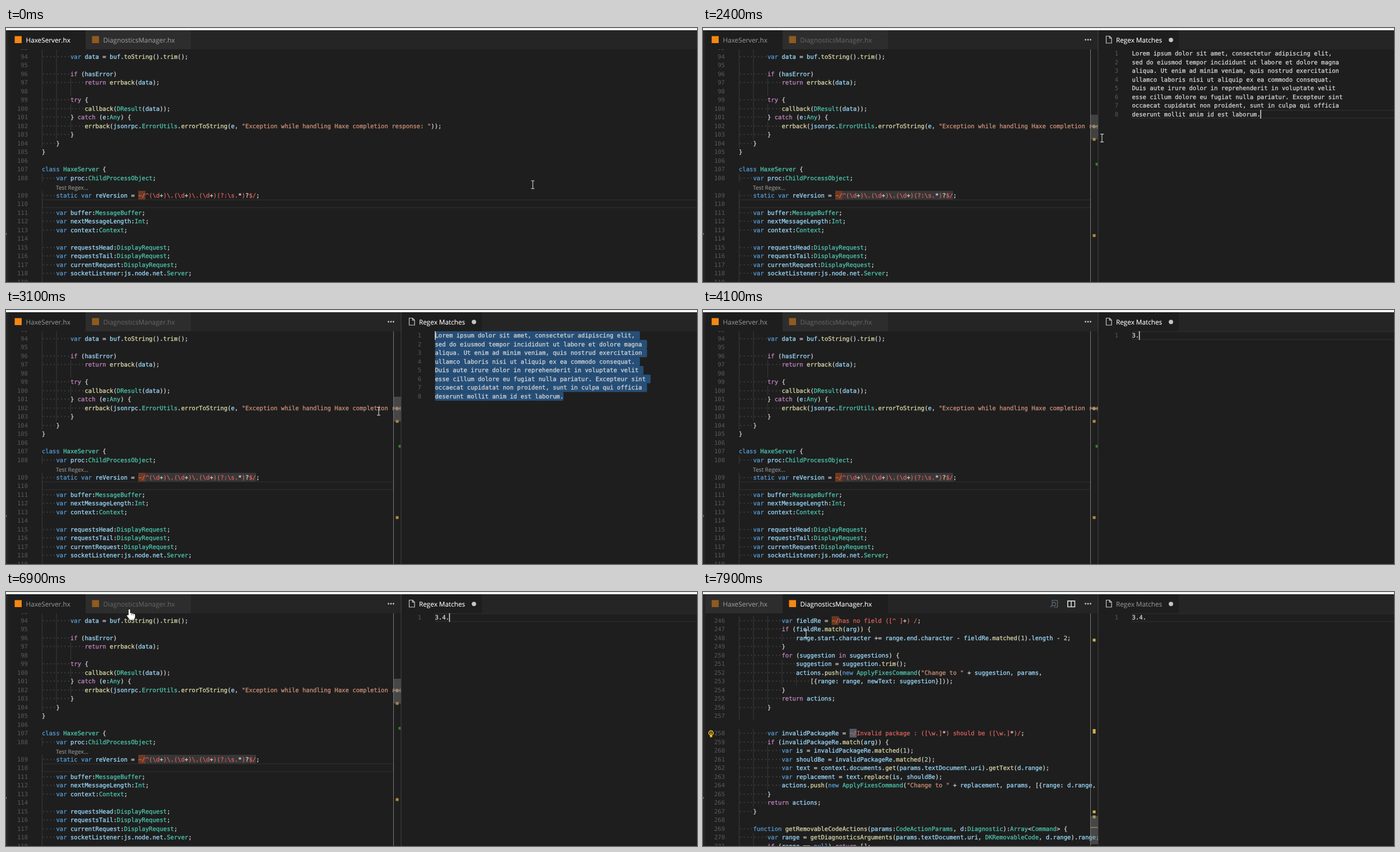
Animation, 1233 px wide and 454 px high, one loop 8000 ms. Source, as an HTML page:

```html
<!DOCTYPE html>
<html lang="en">
<head>
<meta charset="utf-8">
<title>Regex preview</title>
<style>
html, body { margin: 0; width: 100%; height: 100%; overflow: hidden; background: #1e1e1e; }
svg { display: block; width: 1233px; height: 454px; }
text { white-space: pre; text-rendering: geometricPrecision; font: 10.58px "DejaVu Sans Mono", monospace; color: #d8d8d8; }
text, tspan { fill: currentColor; stroke: currentColor; stroke-width: .28px; }
.ui { font: 11.75px "Open Sans", sans-serif; color: #fff; stroke-width: .12px; }
.lens { font-size: 10.15px; color: #999; }
.lens.hover { color: #4e94ce; text-decoration: underline; }
.num { color: #5a5a5a; text-anchor: end; stroke-width: 0; }
.dots { color: #484848; }
.regex { color: #dc625c; } .str { color: #ce9178; } .key { color: #569cd6; } .ctrl { color: #c586c0; }
.type { color: #4ec9b0; } .func { color: #dcdcaa; } .lit { color: #b5cea8; } .name { color: #9cdcfe; }
.quant { color: #d4d4d4; }
</style>
</head>
<body>
<svg id="stage" viewBox="0 0 1233 454"></svg>
<script>
const CH = 6.37, LH = 15.5, LEFT = 64, RIGHT = 765.5;

const serverCode = String.raw`

        var data = buf.toString().trim();

        if (hasError)
            return errback(data);

        try {
            callback(DResult(data));
        } catch (e:Any) {
            errback(jsonrpc.ErrorUtils.errorToString(e, "Exception while handling Haxe completion response: "));
        }
    }
}

class HaxeServer {
    var proc:ChildProcessObject;
    static var reVersion = ~/^(\d+)\.(\d+)\.(\d+)(?:\s.*)?$/;

    var buffer:MessageBuffer;
    var nextMessageLength:Int;
    var context:Context;

    var requestsHead:DisplayRequest;
    var requestsTail:DisplayRequest;
    var currentRequest:DisplayRequest;
    var socketListener:js.node.net.Server;
`.split("\n").slice(1);

const managerCode = String.raw`
            var fieldRe = ~/has no field ([^ ]+) /;
            if (fieldRe.match(arg)) {
                range.start.character += range.end.character - fieldRe.matched(1).length - 2;
            }
            for (suggestion in suggestions) {
                suggestion = suggestion.trim();
                actions.push(new ApplyFixesCommand("Change to " + suggestion, params,
                    [{range: range, newText: suggestion}]));
            }
            return actions;
        }

        var invalidPackageRe = ~/Invalid package : ([\w.]*) should be ([\w.]*)/;
        if (invalidPackageRe.match(arg)) {
            var is = invalidPackageRe.matched(1);
            var shouldBe = invalidPackageRe.matched(2);
            var text = context.documents.get(params.textDocument.uri).getText(d.range);
            var replacement = text.replace(is, shouldBe);
            actions.push(new ApplyFixesCommand("Change to " + replacement, params, [{range: d.range,
        }
        return actions;
    }

    function getRemovableCodeActions(params:CodeActionParams, d:Diagnostic):Array<Command> {
        var range = getDiagnosticsArguments(params.textDocument.uri, DKRemovableCode, d.range).range;
        if (range == null) return [];`.split("\n").slice(1);

const lorem = `Lorem ipsum dolor sit amet, consectetur adipiscing elit,
sed do eiusmod tempor incididunt ut labore et dolore magna
aliqua. Ut enim ad minim veniam, quis nostrud exercitation
ullamco laboris nisi ut aliquip ex ea commodo consequat.
Duis aute irure dolor in reprehenderit in voluptate velit
esse cillum dolore eu fugiat nulla pariatur. Excepteur sint
occaecat cupidatat non proident, sunt in culpa qui officia
deserunt mollit anim id est laborum.`.split("\n");

const rect = (x, y, w, h, fill, more = "") =>
  `<rect x="${x}" y="${y}" width="${w}" height="${h}" fill="${fill}" ${more}/>`;
const text = (x, y, s, cls = "", more = "") =>
  `<text x="${x}" y="${y}" class="${cls}" ${more}>${s}</text>`;
const lineBox = (x, y, x2) =>
  rect(x + 1, y + .8, x2 - x, 13.9, "none", 'stroke="#2b2b2b" stroke-width="1.6"');
const caret = (x, y) => rect(x, y, 1.6, LH, "#d4d4d4");

const TOKEN = /(~\/.*\/(?=;))|("[^"]*")|\b(var|class|static|function|new|null)\b|\b(if|return|try|catch|for|in)\b|([A-Z]\w*)|([a-z]\w*(?=\())|(\d+)|([a-z]\w*)|</g;
const KINDS = ["regex", "str", "key", "ctrl", "type", "func", "lit", "name"];

function colour(code) {
  return code.replace(TOKEN, (s, ...groups) => {
    const kind = KINDS[groups.slice(0, 8).findIndex(g => g !== undefined)];
    if (!kind) return "&lt;";
    if (kind === "regex") s = s.replace(/(?<!\()[+*?]/g, '<tspan class="quant">$&</tspan>');
    return `<tspan class="${kind}">${s}</tspan>`;
  });
}

// One file: numbers, indent guides, whitespace dots and coloured code
function codeView(lines, first, middle, lensLine) {
  const indent = s => s ? s.search(/\S/) : 0;
  return lines.map((line, i) => {
    const y = middle + LH * (i + (first + i >= lensLine));
    const cols = line ? indent(line) : Math.max(indent(lines[i - 1]), indent(lines[i + 1]));
    let out = text(39, y + 3.65, first + i, "num");
    for (let c = 0; c < cols; c += 4) out += rect(LEFT + c * CH, y - LH / 2, 1, LH, "#3c3c3c");
    if (!line) return out;
    return out + text(LEFT, y + 3.65, "·".repeat(cols), "dots") +
      text(LEFT + cols * CH, y + 3.65, colour(line.slice(cols)));
  }).join("");
}

const serverView = codeView(serverCode, 93, 35.5, 109);
const managerView = codeView(managerCode, 246, 51, 258);

// Linear interpolation through [time, ...values]
function along(keys, t) {
  const i = keys.findIndex(k => k[0] > t);
  if (i < 0) return keys[keys.length - 1].slice(1);
  const a = keys[i - 1], b = keys[i], f = (t - a[0]) / (b[0] - a[0]);
  return a.slice(1).map((v, j) => v + (b[j + 1] - v) * f);
}

const mousePath = [
  [0, 940, 280], [300, 700, 150], [500, 520, 112], [800, 319, 155], [900, 319, 155],
  [1000, 366, 240], [1200, 200, 302], [1400, 136, 282], [2000, 136, 282], [2600, 1000, 154],
  [2700, 958, 107], [2800, 696, 3], [2900, 690, 62], [3300, 640, 300], [3700, 628, 385],
  [6100, 640, 445], [6400, 560, 330], [6700, 300, 80], [6900, 220, 31], [7000, 184, 34],
  [7200, 184, 24], [7400, 184, 24], [7800, 184, 75], [7900, 184, 75]];
const thumbFade = [[0, 1], [2300, 1], [2900, .2], [3000, 1], [3800, 1], [4100, 0], [6200, 0], [6400, 1], [8000, 1]];

function mouse(x, y, hand) {
  return `<g transform="translate(${x} ${y})">` + (hand
    ? '<path d="M-1.7 10V1.2a1.8 1.8 0 0 1 3.6 0V6.2l7 1.6q1.8.6 1.8 2.6v3.6l-2 5.2H.8L-4.6 11.8q-.4-2.4 1.5-1.8z" fill="#fff" stroke="#111" stroke-width=".8"/>' +
      '<path d="M4.5 7.5v3M7.3 8v2.8" stroke="#222" stroke-width=".7"/>'
    : '<path d="M-3-7h2q1 0 1 1q0-1 1-1h2M0-6V6M-3 7h2q1 0 1-1q0 1 1 1h2" fill="none" stroke="#ddd" stroke-width="1.1"/>') + "</g>";
}

function tab(x, w, label, active, focused) {
  const alpha = (active ? 1 : .5) * (focused ? 1 : .5);
  return rect(x, 4, w, 34, active ? "#1e1e1e" : "#2d2d2d") +
    rect(x + 11.5, 14.5, 12.5, 12.5, "#f68712", `opacity="${active ? 1 : .5}"`) +
    text(x + 31.5, 25.7, label, "ui", `opacity="${alpha}"`);
}

function ruler(t, manager) {
  const mark = (y, h = 5) => rect(695.5, y, 5, h, manager ? "#d0b04c" : "#b5893c");
  return rect(691, 38, 1, 416, "#7a7a7a") +
    (manager
      ? mark(83.5) + mark(245, 8) + mark(390.5) + mark(399.5) + rect(692, 420, 13, 1.6, "#a08c50")
      : mark(173.5) + mark(196.5) + mark(368.5) + rect(700.5, 241, 4, 5, "#3a7a2e") +
        rect(692, 175.5, 13, 1.5, "#a0a0a0")) +
    rect(692, manager ? 400 : 155, 13, manager ? 51 : 44.5, "#797979", `opacity="${.45 * along(thumbFade, t)[0]}"`);
}

function actions(focused) {
  const dots = [682.6, 687, 691.4].map(x => `<circle cx="${x}" cy="21" r="1.4" fill="#ccc"/>`).join("");
  if (!focused) return dots;
  return dots +
    '<path d="M650.8 16h12.6v10.5h-12.6zM657.1 16v10.5M650.5 16.2h13.2" fill="none" stroke="#ddd" stroke-width="1.6"/>' +
    '<g fill="none" stroke="#66727a" stroke-width="1.2"><path d="M623 18v-3h9.5v12H626M620 27l3.3-3"/><circle cx="626" cy="21.5" r="3.2"/></g>';
}

function rightPane(t, focused) {
  let out = rect(705, 4, 528, 450, "#1e1e1e") + rect(705, 4, 528, 34, "#252526") +
    rect(705, 4, 144, 34, "#1e1e1e") + rect(704.5, 4, 1, 450, "#444") +
    '<path d="M719.5 14.5h6l3.5 3.5v9h-9.5zM725.3 14.5v3.7h3.7" fill="none" stroke="#ccc" stroke-width="1.2"/>' +
    text(737, 25.7, "Regex Matches", "ui", `opacity="${focused ? 1 : .5}"`) +
    '<circle cx="835" cy="21.3" r="3.9" fill="#c5c5c5"/>';

  const showLorem = t >= 1900 && t < 3800;
  const typed = t < 3900 ? "" : "3.4.0".slice(0, t < 4000 ? 1 : t < 4300 ? 2 : t < 4400 ? 3 : t < 4600 ? 4 : t < 5500 ? 5 : 4);
  const lines = showLorem ? lorem : [typed];
  const top = i => 37.9 + LH * i;

  // The drag selection trails the pointer by one step
  let row = lines.length - 1, col = lines[row].length;
  const selecting = showLorem && t >= 2800;
  if (selecting) [row, col] = t < 2900 ? [4, 30] : [0, 0];
  if (selecting) {
    for (let i = row; i < 8; i++) {
      const from = i === row ? col : 0;
      const width = (lorem[i].length - from + (i < 7 ? 1.4 : 0)) * CH;
      out += rect(RIGHT + from * CH, top(i), width, LH + .2, "#264f78", 'rx="2"');
    }
  } else {
    out += lineBox(RIGHT, top(row), 1240);
  }
  if (typed.length === 5) out += rect(RIGHT, top(0), 5 * CH, LH, "rgba(255,255,0,.35)");
  lines.forEach((line, i) => {
    out += text(741, top(i) + 11.3, i + 1, "num") + text(RIGHT, top(i) + 11.3, line);
  });
  const blinkOff = t >= 5100 && t < 5500 || t >= 5900 && t < 6400 || t >= 7000;
  if (focused && !blinkOff) out += caret(RIGHT + col * CH - .4, top(row));
  return out;
}

function scene(t) {
  const split = t >= 1700, manager = t >= 7300;
  const rightFocus = t >= 2100 && !manager, leftFocus = !rightFocus;
  const [mx, my] = along(mousePath, t);
  const onLens = !manager && mx > 89 && mx < 148 && my > 276 && my < 293;
  let out = rect(0, 0, 1233, 454, "#1e1e1e");

  if (manager) {
    out += rect(LEFT + 26 * CH, 43.3, 2 * CH, LH, "#6b3a22") + rect(LEFT + 31 * CH, 244.5, 2 * CH, LH, "#515c6a") + managerView;
    if (t >= 7700) out += '<circle cx="14.3" cy="252" r="3.9" fill="#1e1e1e" stroke="#f0c020" stroke-width="1.7"/>' +
      rect(12.4, 256, 4, 3.5, "#f0c020") + rect(13.3, 250.5, 2, 4, "#f0c020");
  } else {
    out += lineBox(LEFT, 306.3, split ? 690 : 1240);
    if (t >= 1900) out += rect(LEFT + 27 * CH, 291, 33 * CH, LH, "rgba(100,100,100,.35)");
    out += rect(LEFT + 27 * CH, 291, 2 * CH, LH, "#6b3a22") + serverView +
      text(89, 288.7, "Test Regex...", "ui lens" + (onLens ? " hover" : ""));
    if (split && leftFocus) out += caret(LEFT, 306.3);
  }

  out += rect(0, 4, 1233, 34, "#252526") + rect(0, 4, 4, 450, "#252526") + rect(0, 366.5, 1, 3, "#c5a332") +
    tab(4, 138, "HaxeServer.hx", !manager, leftFocus) +
    tab(142, 188, "DiagnosticsManager.hx", manager, leftFocus);
  if (split) out += ruler(t, manager) + actions(leftFocus) + rightPane(t, rightFocus);
  out += rect(0, 0, 1233, 4, "#f1f5f2");
  if (t < 3800 || t >= 6200) out += mouse(mx, my, onLens || my < 40);
  return out;
}

const stage = document.getElementById("stage");
let shown = -1;
function tick() {
  const t = Math.floor(performance.now() % 8000 / 100) * 100;
  if (t !== shown) stage.innerHTML = scene(shown = t);
  requestAnimationFrame(tick);
}
tick();
</script>
</body>
</html>
```
